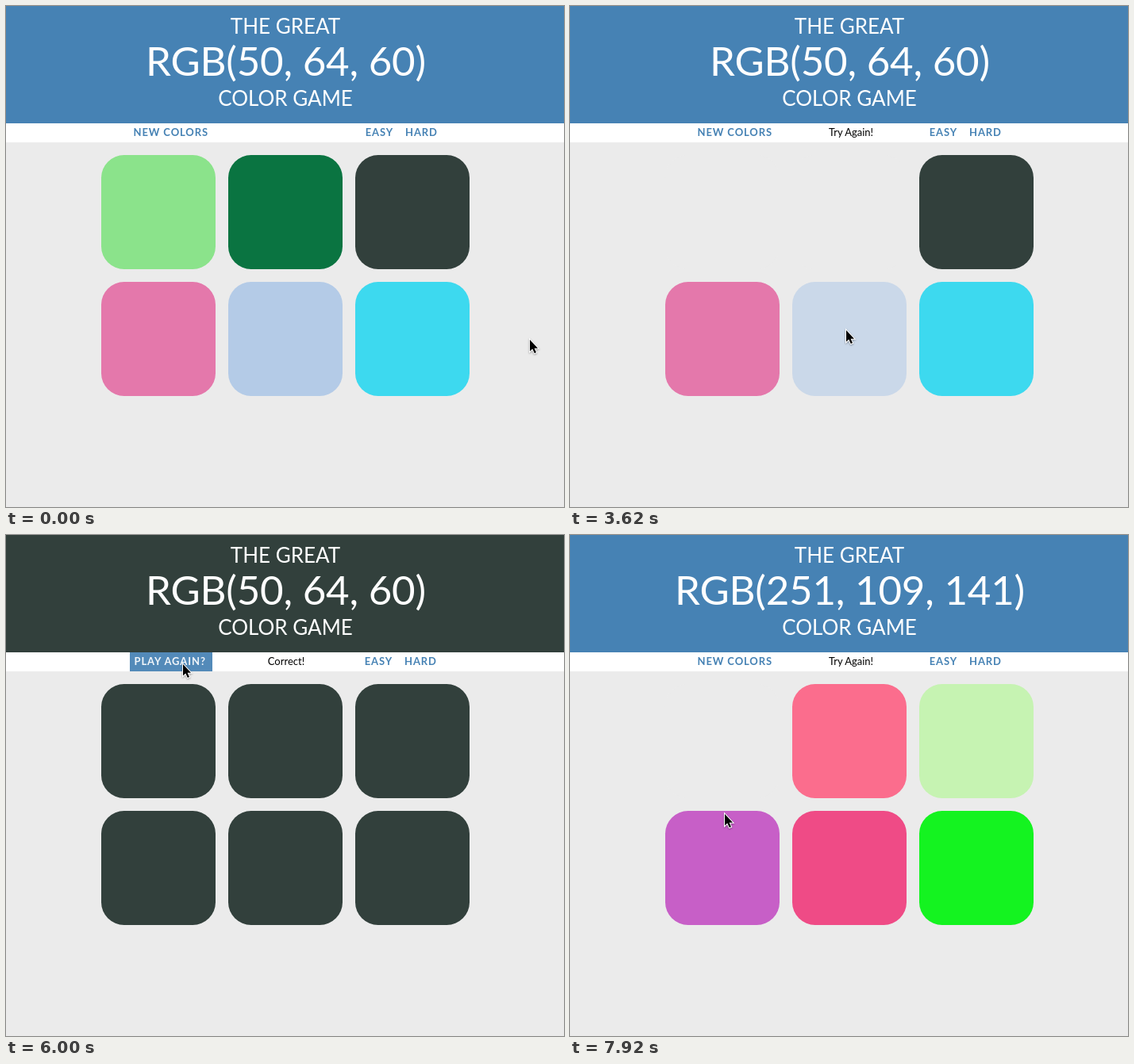
Animation, 703 px wide and 632 px high, one loop 8 s. Source, as an HTML page:

```html
<!DOCTYPE html>
<html lang="en">
<head>
<meta charset="utf-8">
<title>Color Game</title>
<style>
  html, body { margin: 0; width: 100%; height: 100%; overflow: hidden; background: #ebebeb; }
  svg { display: block; width: 703px; height: 632px; font-family: Lato, sans-serif; }
  .title { fill: #fff; text-anchor: middle; font-size: 26px; }
  .big { font-size: 51px; letter-spacing: -.2px; }
  .nav { font-size: 13px; font-weight: 700; letter-spacing: .9px; fill: #4682b4; }
  .msg { font-size: 13px; text-anchor: middle; }
  #cursor { filter: drop-shadow(0 1px 1px rgba(0, 0, 0, .35)); }
</style>
</head>
<body>
<svg viewBox="0 0 703 632">
  <rect width="703" height="632" fill="#ebebeb"/>
  <rect id="header" width="703" height="148"/>
  <text class="title" x="352" y="34.5">THE GREAT</text>
  <text class="title big" id="goal" x="352.5" y="88"></text>
  <text class="title" x="352" y="125.5">COLOR GAME</text>
  <rect y="148" width="703" height="24" fill="#fff"/>
  <rect id="hover" y="148" height="24" fill="#4682b4"/>
  <text class="nav" id="reset" y="164"></text>
  <text class="msg" id="msg" y="164"></text>
  <g class="nav" id="modes"><text x="452.7" y="164">EASY</text><text x="503" y="164">HARD</text></g>
  <g id="tiles"></g>
  <path id="cursor" d="M0 0V14.6L3.3 11.5L5.8 17L8 16.1L5.6 10.7H10Z"
    stroke="#fff" stroke-width="2" paint-order="stroke"/>
</svg>
<script>
const LOOP = 8000, STEP = 148.4, FADE = 300;
const WIN = 4600, RESET = 6240, ENTER = 5790, LEAVE = 6800;

const rgb = hex => [1, 3, 5].map(i => parseInt(hex.slice(i, i + 2), 16));
const [PAGE, DARK, BLUE, WHITE] = ["#ebebeb", "#32403c", "#4682b4", "#ffffff"].map(rgb);
const first = ["#8be38b", "#0a7441", "#32403c", "#e478ab", "#b4cbe7", "#3dd9ef"].map(rgb);
const second = ["#d8eca4", "#fb6d8d", "#c6f3b2", "#c75fc7", "#ef4b86", "#14f320"].map(rgb);

const misses = [{ at: 1780, tile: 1 }, { at: 2700, tile: 0 }, { at: 3560, tile: 4 }, { at: 7420, tile: 0 }];
const home = [660, 421];
const moves = [
  { from: 400, to: 1390, pos: [388, 278] },
  { from: 2150, to: 2600, pos: [222, 285] },
  { from: 2950, to: 3500, pos: [348, 409] },
  { from: 3760, to: 4250, pos: [496, 310] },
  { from: 5480, to: 5950, pos: [223, 163] },
  { from: 6640, to: 7180, pos: [197, 248] },
  { from: 7630, to: 7910, pos: [195, 352] }
];

const $ = id => document.getElementById(id);
const set = (el, attrs) => { for (const k in attrs) el.setAttribute(k, attrs[k]); };
const css = c => `rgb(${c.map(Math.round)})`;
const mix = (a, b, k) => a.map((v, i) => v + (b[i] - v) * k);
const part = (t, a, b) => Math.min(1, Math.max(0, (t - a) / (b - a)));
const smooth = p => p * p * (3 - 2 * p);
const fade = (t, at) => 1 - (1 - part(t, at, at + FADE)) ** 2.4;

const tiles = first.map((_, i) => {
  const r = document.createElementNS("http://www.w3.org/2000/svg", "rect");
  set(r, { x: 120 + i % 3 * 160, y: 188 + (i / 3 | 0) * 160, width: 144, height: 144, rx: 28.8 });
  return $("tiles").appendChild(r);
});

// the screen refreshes in steps, and stalls after the win until the pointer moves
function snap(time) {
  const step = t => 500 + Math.floor((t - 500) / STEP) * STEP;
  const t = step(time);
  return t > WIN && t < moves[4].from ? Math.min(t, step(WIN + FADE)) : t;
}

const pointer = t => moves.reduce((p, m) => mix(p, m.pos, smooth(part(t, m.from, m.to))), home);

function tileColor(i, t) {
  const won = t >= RESET;
  let c = won ? mix(DARK, second[i], fade(t, RESET)) : first[i];
  for (const m of misses)
    if (m.tile === i && m.at > RESET === won) c = mix(c, PAGE, fade(t, m.at));
  return won ? c : mix(c, DARK, fade(t, WIN));
}

function draw(time) {
  const t = snap(time), won = t >= WIN && t < RESET;
  const guessed = misses.some(m => m.at <= t && m.at > RESET === t >= RESET);
  const over = fade(t, ENTER) * (1 - fade(t, LEAVE));

  set($("header"), { fill: css(won ? DARK : BLUE) });
  $("goal").textContent = `RGB(${(t < RESET ? DARK : second[1]).join(", ")})`;
  $("reset").textContent = won ? "PLAY AGAIN?" : "NEW COLORS";
  set($("reset"), { x: won ? 161.5 : 160.5 });
  $("reset").style.fill = css(mix(BLUE, WHITE, over));
  set($("hover"), { x: won ? 156 : 155, width: won ? 104 : 106, opacity: over });
  $("msg").textContent = won ? "Correct!" : guessed ? "Try Again!" : "";
  set($("msg"), { x: won ? 353 : 354 });
  set($("modes"), { transform: `translate(${won ? -1 : 0} 0)` });
  tiles.forEach((el, i) => set(el, { fill: css(tileColor(i, t)) }));
  set($("cursor"), { transform: `translate(${pointer(t).map(Math.round)})` });
}

const start = performance.now();
function tick() {
  draw((performance.now() - start) % LOOP);
  requestAnimationFrame(tick);
}
tick();
</script>
</body>
</html>
```
